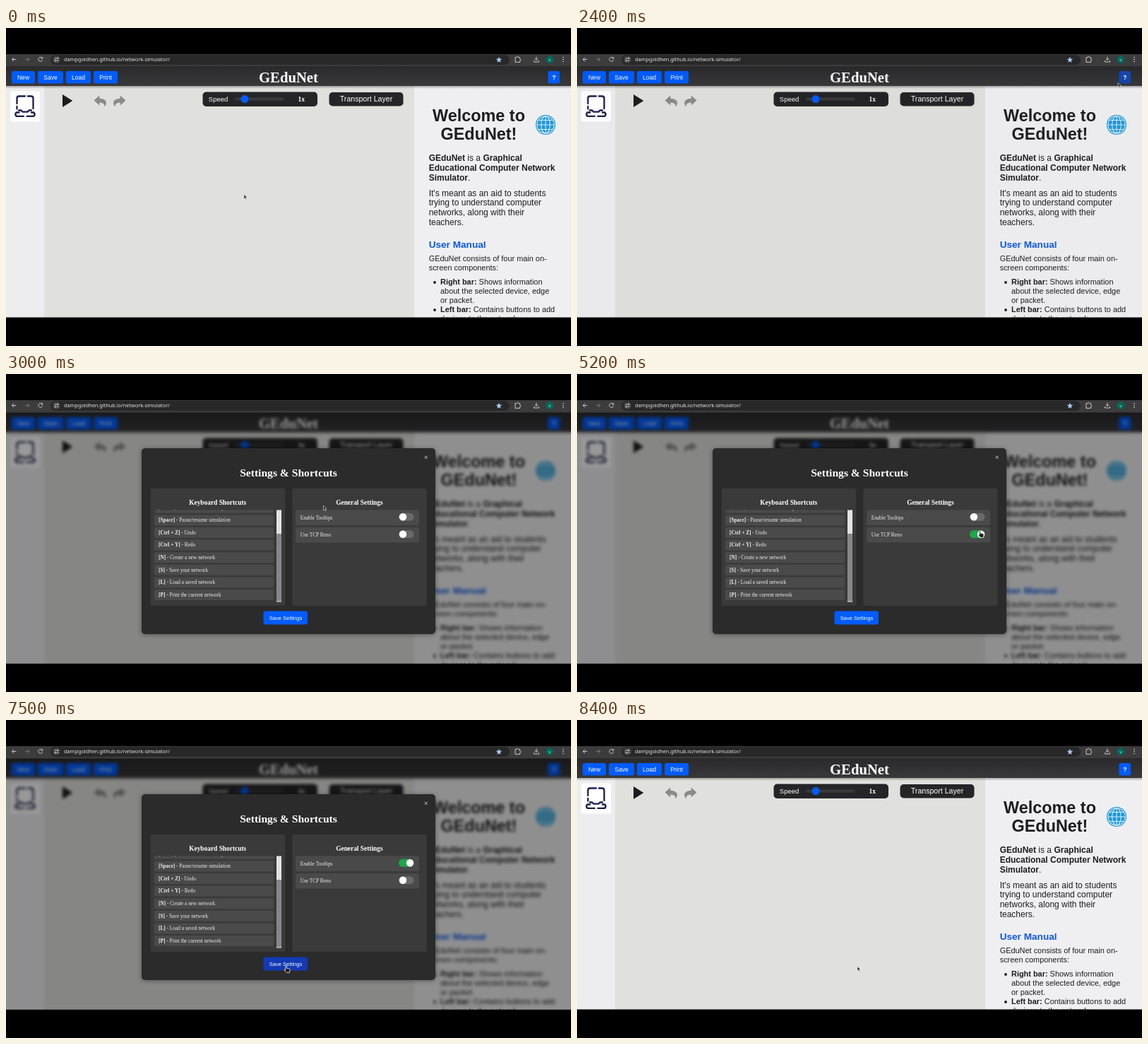
Recreate the animation shown at these times as an HTML page. Size 800 by 450 pixels, loop 9700 ms.

```html
<!DOCTYPE html>
<html lang="en">
<head>
<meta charset="utf-8">
<title>GEduNet settings</title>
<style>
html, body { margin: 0; width: 100%; height: 100%; overflow: hidden; background: #000; }
svg, #shade { position: absolute; left: 0; top: 0; }
svg { width: 800px; height: 450px; }
text { font-family: "Liberation Sans", Arial, sans-serif; white-space: pre; }
.serif, .serif text { font-family: "Liberation Serif", "Times New Roman", serif; }
.b { font-weight: bold; }
.mid { text-anchor: middle; }
#shade { top: 55px; width: 800px; height: 354px; background: rgba(0,0,0,.4); backdrop-filter: blur(2.2px); }
#modal { transform-origin: 400px 236.5px; }
</style>
</head>
<body>
<svg viewBox="0 0 800 450">
  <defs>
    <clipPath id="page"><rect y="54" width="800" height="355.5"/></clipPath>
    <linearGradient id="bar" x2="0" y2="1"><stop stop-color="#2a2a2c"/><stop offset="1" stop-color="#38383a"/></linearGradient>
    <linearGradient id="drop" x2="0" y2="1"><stop stop-opacity=".3"/><stop offset="1" stop-opacity="0"/></linearGradient>
  </defs>

  <!-- browser toolbar -->
  <rect y="37" width="800" height="17.5" fill="#3c3c3c"/>
  <rect x="63" y="38" width="650" height="14" rx="7" fill="#282828"/>
  <g fill="none" stroke="#c8c8c8">
    <path d="M14.5 44.5h-6m2.7-2.7l-2.7 2.7 2.7 2.7"/>
    <path d="M27 44.5h6m-2.7-2.7l2.7 2.7-2.7 2.7" stroke="#777"/>
    <path d="M51.3 42.6a3 3 0 1 0 .4 2.6M51.8 41v2.2h-2.2"/>
    <path d="M721 41.500h2.200a1.200 1.200 0 0 1 2.400 0h2v2.500a1.200 1.200 0 0 1 0 2.400v2h-6.600z"/>
    <path d="M751 40.500v5m-2.300-2.200l2.300 2.300 2.300-2.300M747.500 46v2h7v-2"/>
  </g>
  <circle cx="71.500" cy="44.500" r="5.500" fill="#3f3f3f"/>
  <g fill="none" stroke="#ddd" stroke-width=".9">
    <path d="M68.500 43h3M71.500 46.300h3"/><circle cx="73.200" cy="43" r="1"/><circle cx="69.800" cy="46.300" r="1"/>
  </g>
  <text x="82" y="47.300" font-size="7.300" fill="#e3e3e3" style="font-family:'Noto Sans',sans-serif">dampgoldhen.github.io/network-simulator/</text>
  <path d="M698 40.800l1.200 2.800 3 .2-2.300 2 .7 3-2.600-1.600-2.600 1.600.7-3-2.300-2 3-.2z" fill="#a8c7fa"/>
  <circle cx="769.800" cy="44.500" r="5.300" fill="#00695c"/>
  <text class="mid" x="769.800" y="46.700" font-size="6" fill="#eee">v</text>
  <g fill="#ddd"><circle cx="789" cy="41.500" r=".8"/><circle cx="789" cy="44.500" r=".8"/><circle cx="789" cy="47.500" r=".8"/></g>

  <g clip-path="url(#page)">
    <rect y="82" width="54" height="328" fill="#ededf0"/>
    <rect id="board" x="54" y="82" width="524" height="328" fill="#e0e1dc"/>
    <rect x="578" y="82" width="222" height="328" fill="#efeff1"/>
    <rect y="82" width="800" height="4" fill="url(#drop)"/>
    <rect y="54" width="800" height="28" fill="url(#bar)"/>
    <text class="serif b mid" x="400" y="76.800" font-size="20.700" fill="#fff">GEduNet</text>
    <g id="menu" font-size="8.600" fill="#fff"></g>

    <!-- device palette -->
    <rect x="6" y="89.500" width="42" height="43" rx="3" fill="#fff"/>
    <g fill="none" stroke="#1c1c4a" stroke-width="2.300" stroke-linecap="round" stroke-linejoin="round">
      <path d="M15.500 107V99.500q0-3 3-3H27M31 96.500h4.500q3 0 3 3V114M15.500 111v3.500M18 116.500h3.500l2 2.200h7l2-2.200H36"/>
      <path d="M18.500 119.500h-4q-2.300 2.500 0 5.300H25M29.500 124.800h10q2.300-2.800 0-5.300h-3.500"/>
    </g>

    <!-- canvas controls -->
    <path d="M80 94v18l14.300-9z" fill="#1d1d1f"/>
    <path id="undo" d="M124.500 102.500l7.800-7v4.300q9.700.5 9.700 6.500 0 3-2.600 5 .8-5.800-7.100-5.900v4.200z" fill="#8b8b8a"/>
    <use href="#undo" transform="matrix(-1 0 0 1 294 0)"/>
    <g fill="#252527"><rect x="278.500" y="90.500" width="162.500" height="20.500" rx="5"/><rect x="457.500" y="91" width="105" height="19.500" rx="5"/></g>
    <rect x="324" y="98.300" width="69.500" height="4.500" rx="2.200" fill="#38383a"/>
    <circle cx="338" cy="100.600" r="5.500" fill="#005cfe"/>
    <g fill="#fff">
      <text x="286.800" y="104" font-size="9.500">Speed</text>
      <text class="serif b" x="413.500" y="104" font-size="9.500">1x</text>
      <text class="mid" x="510" y="104.200" font-size="10.600">Transport Layer</text>
    </g>

    <!-- help panel -->
    <g fill="#1d1d1f" font-size="12">
      <g class="b mid" font-size="23.400"><text x="669.500" y="132">Welcome to</text><text x="669.500" y="158.300">GEduNet!</text></g>
      <text x="598.700" y="188"><tspan class="b">GEduNet</tspan> is a <tspan class="b">Graphical</tspan></text>
      <text class="b" x="598.700" y="201.800">Educational Computer Network</text>
      <text x="598.700" y="215.500"><tspan class="b">Simulator</tspan>.</text>
      <text x="598.700" y="237.500">It's meant as an aid to students</text>
      <text x="598.700" y="251.300">trying to understand computer</text>
      <text x="598.700" y="265">networks, along with their</text>
      <text x="598.700" y="278.800">teachers.</text>
      <text class="b" x="598.700" y="311" font-size="13.600" fill="#0b57e0">User Manual</text>
      <g font-size="10.930">
        <text x="598.700" y="329.700">GEduNet consists of four main on-</text>
        <text x="598.700" y="342.700">screen components:</text>
        <circle cx="607" cy="360" r="1.900"/><circle cx="607" cy="399" r="1.900"/>
        <text x="615" y="363.300"><tspan class="b">Right bar:</tspan> Shows information</text>
        <text x="615" y="376.300">about the selected device, edge</text>
        <text x="615" y="389.300">or packet.</text>
        <text x="615" y="402.300"><tspan class="b">Left bar:</tspan> Contains buttons to add</text>
        <text x="615" y="415.300">devices to the network.</text>
      </g>
    </g>
    <circle cx="764" cy="137" r="14" fill="#1f97d6"/>
    <g fill="none" stroke="#d8eef8" stroke-width="1.100">
      <circle cx="764" cy="137" r="12.200"/><ellipse cx="764" cy="137" rx="6.300" ry="12.200"/>
      <path d="M764 124.500v25M751.500 137h25M753.500 130.500h21M753.500 143.500h21"/>
    </g>
  </g>
</svg>

<div id="shade"></div>

<svg id="modal" class="serif" viewBox="0 0 800 450">
  <defs><clipPath id="list"><rect x="205" y="192.500" width="190" height="130.500"/></clipPath></defs>
  <rect x="192" y="105" width="416" height="263" rx="5" fill="#2b2b2b" style="filter:drop-shadow(0 1px 3px rgba(0,0,0,.4))"/>
  <g fill="#3a3a3a"><rect x="204.700" y="162" width="190.500" height="166" rx="3"/><rect x="405.300" y="162" width="190.300" height="166" rx="3"/></g>
  <g class="b mid" fill="#fff">
    <text x="400" y="145" font-size="15.600">Settings &amp; Shortcuts</text>
    <text x="299.700" y="185" font-size="9.400">Keyboard Shortcuts</text>
    <text x="500.400" y="185" font-size="9.400">General Settings</text>
  </g>
  <path d="M592.700 115.800l4 4m0-4l-4 4" stroke="#ddd" stroke-width=".9"/>
  <g id="rows" clip-path="url(#list)" font-size="7.300" fill="#eee"></g>
  <rect x="383" y="192.500" width="7" height="130" fill="#e2e2e2"/>
  <rect x="383" y="226" width="7" height="95.500" rx="1" fill="#87878b"/>
  <g id="options" font-size="7.300" fill="#eee"></g>
  <rect id="save" x="364.500" y="335.500" width="62.500" height="19" rx="3"/>
  <text class="mid" x="396" y="347.700" font-size="7.500" fill="#fff" style="font-family:'Liberation Sans',sans-serif">Save Settings</text>
</svg>

<svg viewBox="0 0 800 450">
  <g id="cursor" fill="#1c1c1c" stroke="#f4f4f4" stroke-width=".6" stroke-linejoin="round">
    <path id="arrow" d="M0 0v6l1.400-1.100 1 2.200 1.100-.5-1-2.100h1.900z"/>
    <path id="hand" d="M-1.200 0q1-.8 1.800 0v2.800l3 .5q1.500.3 1.400 1.800l-.6 3.800h-4.200l-3-3.300q-.4-1.400 1-1l.6.600z" stroke-width=".8"/>
  </g>
</svg>

<script>
const $ = id => document.getElementById(id);
const BLUE = '#005cfe';

$('menu').innerHTML = [['New', 8, 33], ['Save', 45, 36], ['Load', 85, 35], ['Print', 124, 34], ['?', 767.5, 16.5]]
  .map(([label, x, w]) => `<rect x="${x}" y="61" width="${w}" height="17.500" rx="2.500" fill="${BLUE}"/>
    <text class="mid${label == '?' ? ' b' : ''}" x="${x + w / 2}" y="72.500">${label}</text>`).join('');
const help = $('menu').querySelectorAll('rect')[4];

$('rows').innerHTML = [['Delete', 'Remove selected object'], ['Space', 'Pause/resume simulation'], ['Ctrl + Z', 'Undo'],
  ['Ctrl + Y', 'Redo'], ['N', 'Create a new network'], ['S', 'Save your network'],
  ['L', 'Load a saved network'], ['P', 'Print the current network']]
  .map(([key, use], i) => {
    const y = 189.300 + i * 17.600;
    return `<rect x="210" y="${y - 7.500}" width="169" height="15" rx="2" fill="#4a4a4a"/>
      <text x="216" y="${y + 2.300}"><tspan class="b">[${key}]</tspan> - ${use}</text>`;
  }).join('');

$('options').innerHTML = ['Enable Tooltips', 'Use TCP Reno'].map((label, i) => {
  const y = 203 + i * 24.500;
  return `<rect x="410" y="${y - 10.500}" width="175" height="21.500" rx="3" fill="#4a4a4a"/>
    <text x="416.700" y="${y + 2.500}">${label}</text>
    <rect class="track" x="556" y="${y - 6.200}" width="21.500" height="11" rx="5.500"/>
    <circle class="knob" cy="${y - .700}" r="5.200" fill="#fff"/>`;
}).join('');
const tracks = document.querySelectorAll('.track'), knobs = document.querySelectorAll('.knob');

const clamp = v => Math.min(1, Math.max(0, v));
const smooth = v => v * v * (3 - 2 * v);
const easeOut = v => 1 - (1 - v) ** 2.200;
const ramp = (t, start, span) => clamp((t - start) / span);
const mix = (a, b, p) => a + (b - a) * p;
const within = (t, a, b) => t >= a && t < b;

// time, x, y of the pointer tip
const path = [[0, 337, 235.500], [900, 337, 235.500], [1900, 766, 77.500], [2450, 766, 77.500], [3000, 449.500, 186.500],
  [3400, 571, 199], [4300, 571, 199], [4700, 571, 222.500], [5400, 571, 222.500], [6300, 571, 211],
  [6500, 571, 201], [7000, 571, 201], [7400, 397, 348.500], [9700, 397, 349]];

function pointer(t) {
  const i = path.findIndex(k => k[0] > t);
  const [t0, x0, y0] = path[i - 1], [t1, x1, y1] = path[i];
  const p = smooth((t - t0) / (t1 - t0));
  return [mix(x0, x1, p), mix(y0, y1, p)];
}

const flips = [[3800, 4300, 6800], [4900, 5400]];
const switched = (t, times) => times.reduce((p, at, i) => mix(p, 1 - i % 2, smooth(ramp(t, at - 50, 300))), 0);

function draw(t) {
  const shade = ramp(t, 2390, 300) * (1 - ramp(t, 7595, 300));
  const open = t < 5000 ? easeOut(ramp(t, 2395, 200)) : 1 - easeOut(ramp(t, 7585, 200));
  $('shade').style.opacity = shade;
  $('shade').style.display = shade ? '' : 'none';
  $('modal').style.opacity = open * shade;
  $('modal').style.transform = `scale(${.9 + .1 * open})`;

  flips.forEach((times, i) => {
    const on = switched(t, times);
    knobs[i].setAttribute('cx', mix(562, 572, on));
    tracks[i].setAttribute('fill', `rgb(${[[106, 28], [106, 166], [106, 72]].map(c => mix(c[0], c[1], on))})`);
  });
  help.setAttribute('fill', within(t, 2000, 2600) ? '#1746b0' : BLUE);
  $('save').setAttribute('fill', within(t, 7400, 8000) ? '#1439b4' : BLUE);

  const hand = within(t, 3300, 7000) || within(t, 7400, 7600);
  $('arrow').style.display = hand ? 'none' : '';
  $('hand').style.display = hand ? '' : 'none';
  $('cursor').setAttribute('transform', `translate(${pointer(t)})`);
}

function tick() {
  draw(Math.floor(performance.now() % 9700 / 100) * 100);
  requestAnimationFrame(tick);
}
tick();
</script>
</body>
</html>
```
